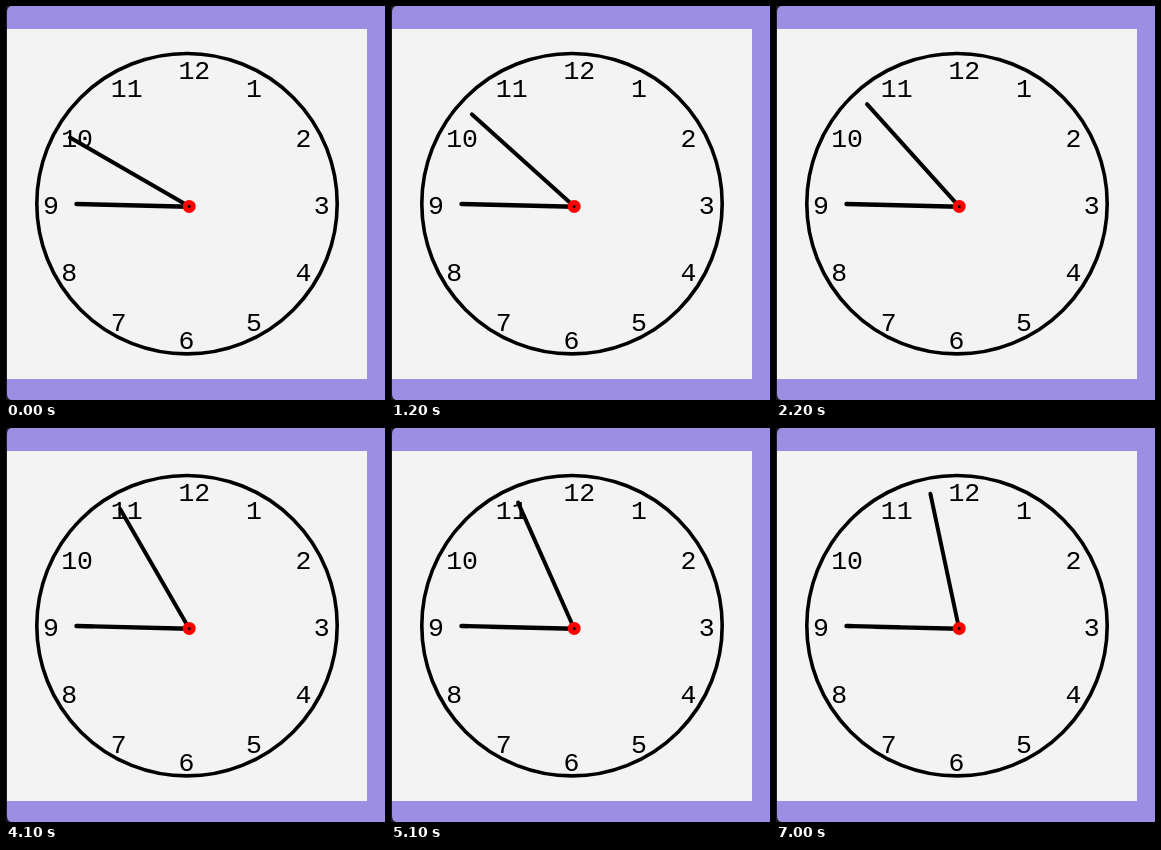
Recreate the animation shown at these times as an HTML page. Size 379 by 394 pixels, loop 8 s.

```html
<!DOCTYPE html>
<html lang="en">
<head>
<meta charset="utf-8">
<title>Clock</title>
<style>
html, body { margin: 0; width: 100%; height: 100%; overflow: hidden; background: #1c1a22; }
svg { display: block; width: 379px; height: 394px; }
text { font: 26.5px "Liberation Mono", monospace; }
</style>
</head>
<body>
<svg viewBox="0 0 379 394">
  <path d="M379 0H5Q1 1 1 6V388Q1 393 5 394H379Z" fill="#9c8ee3"/>
  <rect x="1" y="23" width="360" height="350" fill="#f3f3f3"/>
  <circle cx="181" cy="197.7" r="150.2" fill="none" stroke="#000" stroke-width="3.6"/>
  <g id="digits"></g>
  <g stroke="#000" stroke-linecap="round">
    <path d="M183 200.8L70.5 198" stroke-width="4.4"/>
    <path id="hand" stroke-width="4"/>
  </g>
  <circle cx="183.2" cy="200.4" r="4" fill="#000" stroke="#f00" stroke-width="5"/>
</svg>
<script>
const LOOP = 8000;
const TICKS = [200, 1200, 2200, 3100, 4100, 5100, 6000, 7000];
const START = 50;
const hand = document.getElementById("hand");
const digits = document.getElementById("digits");

// Labels share a left edge offset, so two-digit hours sit further right.
for (let h = 1; h <= 12; h++) {
  const a = h * Math.PI / 6;
  const t = document.createElementNS("http://www.w3.org/2000/svg", "text");
  t.setAttribute("x", 172.4 + 135.3 * Math.sin(a));
  t.setAttribute("y", 208 - 134.8 * Math.cos(a));
  t.textContent = h;
  digits.append(t);
}

function draw(ms) {
  const second = START + TICKS.filter(t => t <= ms).length;
  const a = second * Math.PI / 30;
  const x = 183 + 137.5 * Math.sin(a);
  const y = 200.3 - 137.5 * Math.cos(a);
  hand.setAttribute("d", `M183 200.3L${x} ${y}`);
}

const begin = performance.now();
function frame() {
  draw((performance.now() - begin) % LOOP);
  requestAnimationFrame(frame);
}
draw(0);
requestAnimationFrame(frame);
</script>
</body>
</html>
```
